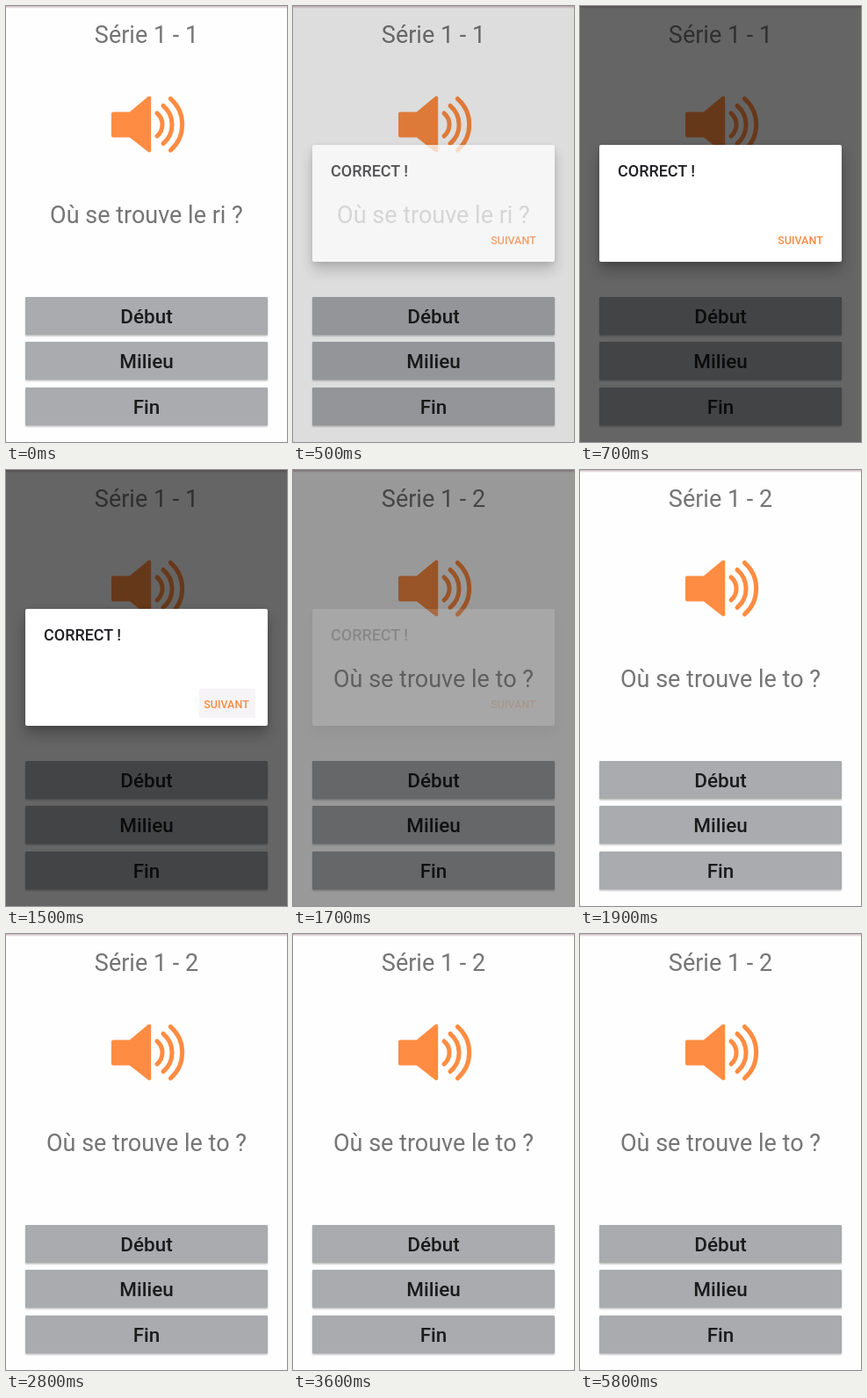
An HTML page that plays this animation: 320 px wide and 496 px high, repeating every 8000 ms.

```html
<!DOCTYPE html>
<html lang="fr">
<head>
<meta charset="utf-8">
<title>Quiz</title>
<style>
  html, body { margin: 0; width: 100%; height: 100%; overflow: hidden; background: #fefefe; }
  body { position: relative; font-family: Roboto, sans-serif; }
  svg { position: absolute; left: 0; top: 0; display: block; }
  .label { font-size: 27px; fill: #757575; text-anchor: middle; }
  .answer { font-size: 22.5px; font-weight: 500; fill: #1b1b1c; text-anchor: middle; }
  .btn {
    position: absolute; left: 22px; width: 276px; height: 43px; border-radius: 1px;
    background: #a9abae; box-shadow: 0 1.5px 2px rgba(0, 0, 0, .28);
  }
  .bar {
    position: absolute; left: 0; top: 0; width: 320px; height: 3px;
    background: linear-gradient(#cdb9bc, #e6dadd 50%, #fefefe);
  }
  .scrim { position: absolute; inset: 0; background: #000; }
  .dialog {
    position: absolute; left: 22px; top: 157.5px; width: 276px; height: 133px;
    border-radius: 2px; background: #fff;
    box-shadow: 0 10px 16px rgba(0, 0, 0, .24), 0 2px 6px rgba(0, 0, 0, .16);
  }
  .press {
    position: absolute; left: 197.5px; top: 91.5px; width: 64.5px; height: 33px;
    border-radius: 2px; background: #f6f4f6;
  }
  .head { font-size: 18px; font-weight: 500; fill: #212125; }
  .next { font-size: 12.5px; font-weight: 500; fill: #fb8a41; text-anchor: middle; }

  .scrim, .dialog, .press, .first, .second { animation: 8s step-end infinite; }
  .scrim { animation-name: dim; }
  .dialog { animation-name: popup; }
  .press { animation-name: press; }
  .first { animation-name: leave; }
  .second { animation-name: enter; }
  @keyframes dim {
    0% { opacity: 0; }
    6.25% { opacity: .13; }
    8.75% { opacity: .6; }
    21.25% { opacity: .4; }
    23.75%, 100% { opacity: 0; }
  }
  @keyframes popup {
    0% { opacity: 0; }
    6.25% { opacity: .73; }
    8.75% { opacity: 1; }
    21.25% { opacity: .14; }
    23.75%, 100% { opacity: 0; }
  }
  @keyframes press {
    0% { opacity: 0; }
    18.75% { opacity: 1; }
    21.25%, 100% { opacity: 0; }
  }
  @keyframes leave {
    0% { opacity: 1; }
    21.25%, 100% { opacity: 0; }
  }
  @keyframes enter {
    0% { opacity: 0; }
    21.25%, 100% { opacity: 1; }
  }
</style>
</head>
<body>
  <div class="bar"></div>
  <div class="btn" style="top:330.5px"></div>
  <div class="btn" style="top:382px"></div>
  <div class="btn" style="top:433.5px"></div>

  <svg width="320" height="496" viewBox="0 0 320 496">
    <g class="label first">
      <text x="160" y="42">Série 1 - 1</text>
      <text x="160" y="247">Où se trouve le ri ?</text>
    </g>
    <g class="label second">
      <text x="160" y="42">Série 1 - 2</text>
      <text x="160" y="247">Où se trouve le to ?</text>
    </g>
    <g fill="#ff8c42" stroke="#ff8c42" stroke-linejoin="round" stroke-linecap="round">
      <path stroke-width="4" d="M122 122.5H141.5L163.2 104.5V164.5L141.5 147.5H122Z"/>
      <g fill="none" stroke-width="5">
        <path d="M172 122A17 17 0 0 1 172 148"/>
        <path d="M179 113.5A28 28 0 0 1 179 156.5"/>
        <path d="M187.5 105.5A39 39 0 0 1 187.5 164"/>
      </g>
    </g>
    <g class="answer">
      <text x="160" y="360.5">Début</text>
      <text x="160" y="412">Milieu</text>
      <text x="160" y="463.5">Fin</text>
    </g>
  </svg>

  <div class="scrim"></div>
  <div class="dialog">
    <div class="press"></div>
    <svg width="276" height="133" viewBox="22 157.5 276 133">
      <text class="head" x="43" y="193">CORRECT !</text>
      <text class="next" x="251" y="270.3">SUIVANT</text>
    </svg>
  </div>
</body>
</html>
```
